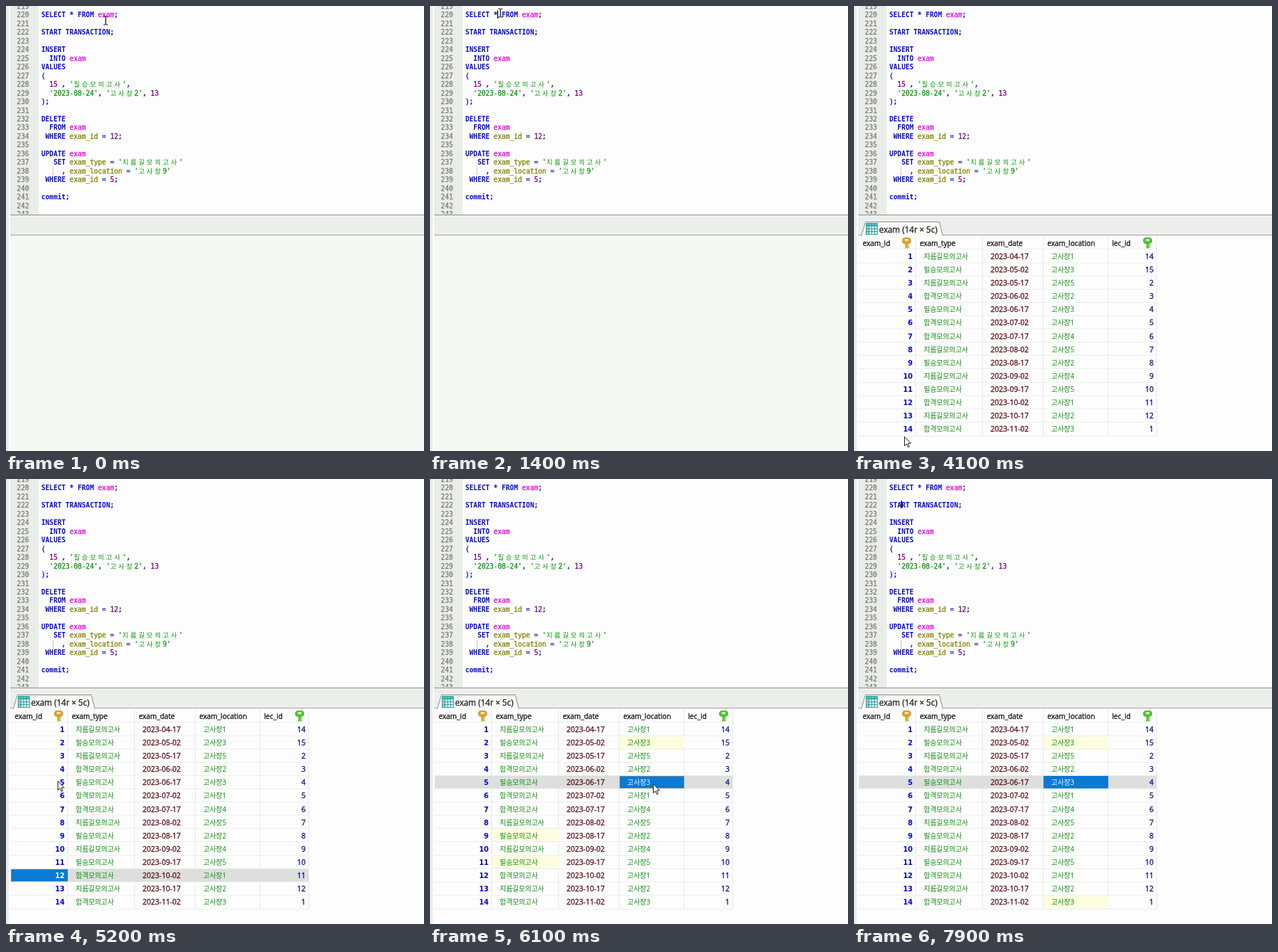
Recreate the animation shown at these times as an HTML page with a canvas. Size 600x640 px, loop 8000 ms.

```html
<!DOCTYPE html>
<html lang="ko">
<head>
<meta charset="utf-8">
<style>
html, body { margin: 0; width: 100%; height: 100%; overflow: hidden; background: #fdfdfd; }
canvas { display: block; }
</style>
</head>
<body>
<canvas id="stage" width="600" height="640"></canvas>
<script>
const ctx = document.getElementById('stage').getContext('2d');
const LOOP = 8000, STEP = 100;
const MONO = '"DejaVu Sans Mono", "Noto Sans CJK KR", "Noto Sans CJK", monospace';
const SANS = '"Open Sans", "Noto Sans CJK KR", "Noto Sans CJK", sans-serif';
const CHAR = 5.81, LINE = 12.476, CODE_X = 50.7;
const ROW = 19.12, GRID_TOP = 350.4;
const COLS = [7, 89, 185, 272, 365, 435];
const RESULT_AT = 2000, EDITOR_CLICK = 7500;

const code = `SELECT * FROM exam;

START TRANSACTION;

INSERT
  INTO exam
VALUES
(
  15 , '필승모의고사',
  '2023-08-24', '고사장2', 13
);

DELETE
  FROM exam
 WHERE exam_id = 12;

UPDATE exam
   SET exam_type = '지름길모의고사'
     , exam_location = '고사장9'
 WHERE exam_id = 5;

commit;`.split('\n');

const tokenRules = [
  [/^'/, '#0a960a'],
  [/^\d/, '#800080'],
  [/^exam$/, '#e000d8'],
  [/^exam_/, '#808000'],
  [/^[A-Za-z]/, '#0808d0', 'bold '],
  [/./, '#0808b0']
];

const types = { J: '지름길모의고사', P: '필승모의고사', H: '합격모의고사' };
const dates = '04-17 05-02 05-17 06-02 06-17 07-02 07-17 08-02 08-17 09-02 09-17 10-02 10-17 11-02'.split(' ');
const rows = dates.map((d, i) => [
  i + 1,
  types['JPJHPHHJPJPHJH'[i]],
  '2023-' + d,
  '고사장' + '13523145245123'[i],
  i < 2 ? 14 + i : i < 13 ? i : 1
]);

// Grid clicks: time, row, column
const clicks = [[4800, 11, 0], [5500, 4, 0], [5700, 4, 1], [6000, 4, 3]];
// Pointer stops: time, x, y
const path = [
  [0, 143, 21], [300, 143, 21], [900, 101, 10], [2800, 101, 10],
  [3500, 72, 619], [4100, 72, 619], [4400, 73, 597], [4800, 74, 571],
  [4900, 74, 571], [5200, 74, 434], [5450, 74, 434], [5700, 130, 438],
  [5800, 130, 438], [6000, 320, 438], [6400, 320, 438],
  [7000, 150, 34], [7500, 69, 36], [8000, 69, 36]
];

function rect(x, y, w, h, color) {
  ctx.fillStyle = color;
  ctx.fillRect(x, y, w, h);
}

function text(s, x, y, font, color, align = 'left') {
  ctx.font = font;
  ctx.fillStyle = ctx.strokeStyle = color;
  ctx.textAlign = align;
  ctx.fillText(s, x, y);
  // Small regular Latin text needs a little extra weight
  if (!font.startsWith('bold') && !/[가-힣]/.test(s)) {
    ctx.lineWidth = 0.3;
    ctx.strokeText(s, x, y);
  }
}

function shape(points, fill, stroke) {
  ctx.beginPath();
  points.forEach(([x, y]) => ctx.lineTo(x, y));
  ctx.closePath();
  ctx.fillStyle = fill;
  ctx.fill();
  ctx.strokeStyle = stroke;
  ctx.lineWidth = 1;
  ctx.stroke();
}

const baseline = n => 16.3 + (n - 220) * LINE;

function drawCodeLine(line, y) {
  let col = 0;
  for (const token of line.match(/'[^']*'|\w+|\s+|./g) || []) {
    const [, color, weight = ''] = tokenRules.find(([re]) => re.test(token));
    for (const ch of token) {
      const wide = ch >= '가';
      text(ch, CODE_X + col * CHAR, y, weight + (wide ? 9.5 : 9.65) + 'px ' + MONO, color);
      col += wide ? 2 : 1;
    }
  }
}

function drawEditor() {
  rect(0, 0, 600, 640, '#fdfdfd');
  rect(6, 0, 41, 300, '#eaecea');
  ctx.save();
  ctx.beginPath();
  ctx.rect(0, 0, 600, 299);
  ctx.clip();
  for (let n = 219; n <= 243; n++)
    text(n, 33, baseline(n), '9.65px ' + MONO, '#787c78', 'right');
  code.forEach((line, i) => drawCodeLine(line, baseline(220 + i)));
  for (let y = 232; y < 243; y += 2) rect(67, y, 1, 1, '#909090');
  ctx.restore();
  rect(0, 0, 4, 640, '#eceeec');
  rect(6, 300, 594, 1, '#8c8e8c');
  rect(6, 301, 594, 28, '#eceeec');
  rect(6, 329, 594, 1, '#a0a2a0');
}

function drawTab() {
  shape([[10.5, 330.5], [16.5, 310.5], [122.5, 310.5], [127.5, 330.5]], '#f8faf8', '#8c8e8c');
  rect(11, 329, 116, 2, '#fafcfa');
  rect(17, 312, 17, 17, '#2f9d9d');
  for (let r = 0; r < 4; r++)
    for (let c = 0; c < 4; c++)
      rect(18 + c * 4, 313 + r * 4, 3, 3, !r ? '#56bcb9' : c ? '#e4f6f5' : '#8ed6d3');
  text('exam (14r × 5c)', 36, 326, '11.8px ' + SANS, '#202020');
}

function drawKey(x, color, edge) {
  rect(x - 2, 340, 4, 8.5, color);
  rect(x + 2, 343, 2, 1.5, color);
  rect(x + 2, 346, 2, 1.5, color);
  ctx.beginPath();
  ctx.roundRect(x - 6, 333.5, 12, 8, 3.5);
  ctx.fillStyle = color;
  ctx.fill();
  ctx.strokeStyle = edge;
  ctx.lineWidth = 0.8;
  ctx.stroke();
  rect(x - 2.5, 335.5, 5, 2, '#fdfdfd');
}

function isMatch(r, c, sel) {
  return sel && sel[2] === c && rows[r][c] === rows[sel[1]][c];
}

function drawActiveCell(x, y, w, h, focused) {
  rect(x, y, w, h, '#0a7ad4');
  if (!focused) return;
  ctx.strokeStyle = '#e0a060';
  ctx.lineWidth = 1;
  ctx.setLineDash([1, 1]);
  ctx.strokeRect(x + 0.5, y + 0.5, w - 1, h - 1);
  ctx.setLineDash([]);
}

function drawGrid(t) {
  const sel = clicks.filter(k => k[0] <= t).at(-1);
  // Lower rows repaint late after the last click
  const late = t >= 6000 && t < 6400 ? clicks[2] : sel;

  ['exam_id', 'exam_type', 'exam_date', 'exam_location', 'lec_id'].forEach((name, c) =>
    text(name, COLS[c] + 5.5, 344.5, '10.2px ' + SANS, '#101010'));
  drawKey(75.5, '#dda82c', '#b9861c');
  drawKey(421.5, '#58c838', '#3c9c28');
  COLS.slice(1).forEach(x => rect(x - 1, 331, 1, 288, '#e6e8e6'));

  rows.forEach((row, r) => {
    const edge = GRID_TOP + r * ROW;
    const top = Math.round(edge), height = Math.round(edge + ROW) - top - 1;
    const current = sel && sel[1] === r;
    const y = edge + 13.4;
    rect(7, top - 1, 427, 1, '#eceeec');
    if (current) rect(7, top, 427, height, '#dcdfdc');
    row.forEach((value, c) => {
      const x = COLS[c], w = COLS[c + 1] - x;
      const active = current && sel[2] === c;
      if (active) drawActiveCell(x, top, w, height, t < EDITOR_CLICK);
      else if (isMatch(r, c, r < 6 ? sel : late)) rect(x, top, w, height, '#fdfde0');

      const ink = active ? '#ffffff' : ['#0808b8', '#0a8c0a', '#580814', '#0a8c0a', '#080890'][c];
      if (c === 0) text(value, 84.3, y, 'bold 10px "DejaVu Sans", sans-serif', ink, 'right');
      else if (c === 4) text(value, 430, y, '10.5px ' + SANS, ink, 'right');
      else text(value, x + 11, y, (c === 2 ? 10.5 : 9.95) + 'px ' + SANS, ink);
    });
  });
  rect(7, 618, 427, 1, '#eceeec');
}

function drawCaret(t) {
  if (t >= 900 && t < 1900 && (t - 900) % 1000 < 600) rect(96.5, 6, 1.3, 12, '#000');
  if (t >= EDITOR_CLICK) rect(67.5, 31, 1.5, 11, '#000');
}

function drawPointer(t) {
  if ((t >= 1900 && t < 2800) || t >= 7700) return;
  const i = path.findIndex(p => p[0] > t);
  const [t0, x0, y0] = path[i - 1], [t1, x1, y1] = path[i];
  const u = (t - t0) / (t1 - t0), e = u * u * (3 - 2 * u);
  const x = x0 + (x1 - x0) * e, y = y0 + (y1 - y0) * e;
  if (y < 300) {
    rect(x - 0.5, y - 6, 1.2, 12, '#000');
    for (const dy of [-6.5, 5.5]) {
      rect(x - 3, y + dy, 2.5, 1, '#000');
      rect(x + 0.7, y + dy, 2.5, 1, '#000');
    }
  } else {
    const arrow = [[0, 0], [0, 13], [3, 10.3], [5, 15], [7, 14], [5, 9.6], [9, 9.4]];
    shape(arrow.map(([dx, dy]) => [x + dx + 0.5, y + dy + 0.5]), '#fff', '#181818');
  }
}

function frame(now) {
  const t = Math.floor(now % LOOP / STEP) * STEP;
  drawEditor();
  if (t >= RESULT_AT) {
    drawTab();
    drawGrid(t);
  } else {
    rect(6, 330, 594, 310, '#f6f8f6');
  }
  drawCaret(t);
  drawPointer(t);
  requestAnimationFrame(frame);
}
requestAnimationFrame(frame);
</script>
</body>
</html>
```
